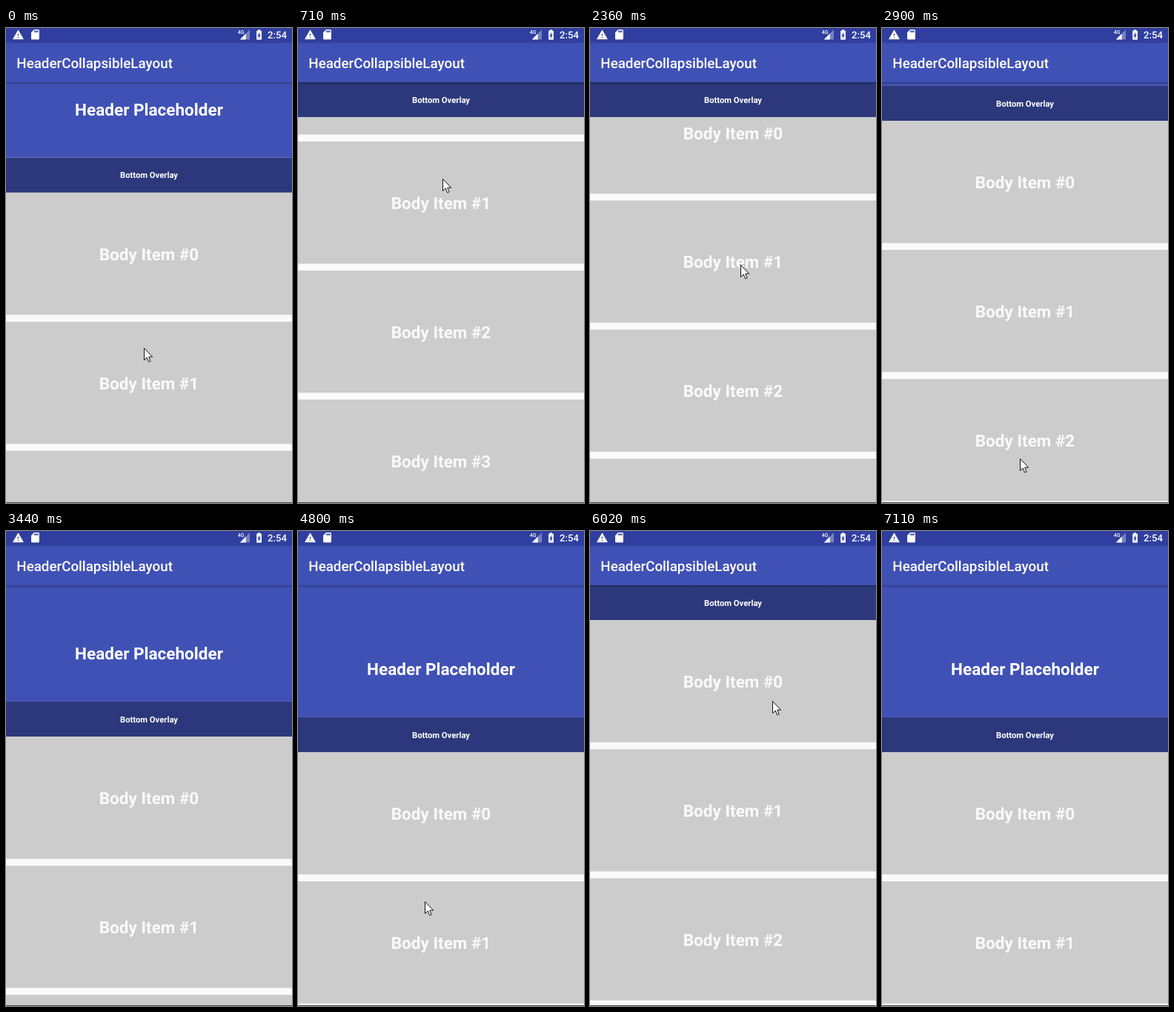
An HTML page for the animation above (8480 ms loop, 386x640 px).

```html
<!DOCTYPE html>
<html lang="en">
<head>
<meta charset="utf-8">
<title>Collapsible header</title>
<style>
html, body { margin: 0; width: 100%; height: 100%; overflow: hidden; background: #fafafa; }
svg { display: block; width: 386px; height: 640px; }
text { font-family: Roboto, sans-serif; fill: #fff; text-rendering: geometricPrecision; }
.big { font-size: 22.53px; font-weight: 700; text-anchor: middle; }
.small { font-size: 11.26px; font-weight: 700; text-anchor: middle; }
.title { font-size: 18.77px; font-weight: 500; }
.clock { font-size: 13.14px; font-weight: 500; }
.net { font-size: 7px; font-weight: 500; }
#body text { fill: #fafafa; }
</style>
</head>
<body>
<svg viewBox="0 0 386 640">
  <defs>
    <linearGradient id="shade" x2="0" y2="1">
      <stop offset="0" stop-opacity=".26"/>
      <stop offset="1" stop-opacity="0"/>
    </linearGradient>
  </defs>
  <rect width="386" height="640" fill="#fafafa"/>
  <g id="body"></g>

  <g id="header">
    <rect y="-260" width="386" height="260" fill="#3f51b5"/>
    <text class="big" x="193" y="-56.8">Header Placeholder</text>
    <rect width="386" height="47.1" fill="#2c387b"/>
    <text class="small" x="193" y="27.9">Bottom Overlay</text>
  </g>

  <rect y="72.9" width="386" height="4" fill="url(#shade)"/>
  <rect width="386" height="72.9" fill="#3f51b5"/>
  <rect width="386" height="20.3" fill="#303f9f"/>
  <text class="title" x="14.3" y="54">HeaderCollapsibleLayout</text>

  <g fill="#fff">
    <path transform="translate(8.3 1) scale(.68)" d="M1 21h22L12 2zm12-3h-2v-2h2zm0-4h-2v-4h2z"/>
    <path transform="translate(31.3 .6) scale(.68)" d="M18 2h-8L4 8v12c0 1.1.9 2 2 2h12c1.1 0 2-.9 2-2V4c0-1.1-.9-2-2-2zm-6 6h-2V4h2zm3 0h-2V4h2zm3 0h-2V4h2z"/>
    <g transform="translate(314.5 1) scale(.66)">
      <path d="M2 22h20V2z" opacity=".35"/>
      <path d="M2 22h12V10z"/>
    </g>
    <g transform="translate(333.4 .8) scale(.68)">
      <path d="M15.7 4H14V2h-4v2H8.3Q7 4 7 5.3v15.4Q7 22 8.3 22h7.4q1.3 0 1.3-1.3V5.3Q17 4 15.7 4z"/>
      <path d="M11 20v-5.5H9L13 7v5.5h2z" fill="#303f9f"/>
    </g>
  </g>
  <text class="net" x="312.8" y="8.2">4G</text>
  <text class="clock" x="353" y="14.3">2:54</text>

  <rect y="639" width="386" height="1" fill="#444"/>
  <path id="cursor" d="M.5.5V16.5L4.2 13 6.7 18.8 9.1 17.8 6.7 12.1H11.7z" fill="#fff" stroke="#111"/>
</svg>
<script>
const LOOP = 8480, STEP = 135;
const BAR = 72.9, RANGE = 178, OVERLAY = 47.2;
const ITEM = 164.6, PITCH = 173.9;

// Pointer position and upward travel (header collapse, then list scroll)
const rest = { x: 186, y: 431, travel: 76.3 };

// Each gesture leads from the pose before it to its own
const gestures = [
  { from: 120, to: 710, x: 195, y: 203, travel: 319.1 },
  { from: 850, to: 1430, x: 223, y: 5, travel: 553.2 },
  { from: 1580, to: 2900, x: 186, y: 580, travel: 173 },
  { from: 3020, to: 3440, x: 180, y: 732, travel: 21 },
  { from: 3900, to: 4350, x: 168, y: 470, travel: 21 },
  { from: 4500, to: 4800, x: 171, y: 499, travel: 0 },
  { from: 5080, to: 6020, x: 246, y: 229, travel: RANGE },
  { from: 6170, to: 7110, x: 190, y: 664, travel: 0 }
];

const $ = id => document.getElementById(id);
const body = $("body"), header = $("header"), cursor = $("cursor");

body.innerHTML = Array.from({ length: 6 }, (_, i) => `
  <g transform="translate(0 ${i * PITCH})">
    <rect width="386" height="${ITEM}" fill="#ccc"/>
    <text class="big" x="193" y="91">Body Item #${i}</text>
  </g>`).join("");

const mix = (a, b, k) => a + (b - a) * k;

// Progress in even, held steps, the last one landing at the end time
function progress({ from, to }, t) {
  const gaps = Math.round((to - from) / STEP);
  const done = Math.floor((t - from + 0.5) / (to - from) * gaps) + 1;
  return Math.min(1, done / (gaps + 1));
}

function poseAt(t) {
  let pose = rest;
  for (const g of gestures) {
    if (t < g.from) break;
    const k = progress(g, t);
    // Content follows the finger one to one until it reaches its limit
    const pace = Math.max(1, Math.abs((g.y - pose.y) / (g.travel - pose.travel)));
    pose = {
      x: mix(pose.x, g.x, k),
      y: mix(pose.y, g.y, k),
      travel: mix(pose.travel, g.travel, Math.min(1, k * pace))
    };
  }
  return pose;
}

const move = (el, x, y) => el.setAttribute("transform", `translate(${x} ${y})`);

function draw(t) {
  const { x, y, travel } = poseAt(t);
  const top = BAR + Math.max(0, RANGE - travel);
  const scroll = Math.max(0, travel - RANGE);
  move(header, 0, top);
  move(body, 0, top + OVERLAY - scroll);
  move(cursor, Math.round(x), Math.round(y));
}

const start = performance.now();
function loop() {
  draw((performance.now() - start) % LOOP);
  requestAnimationFrame(loop);
}
loop();
</script>
</body>
</html>
```
